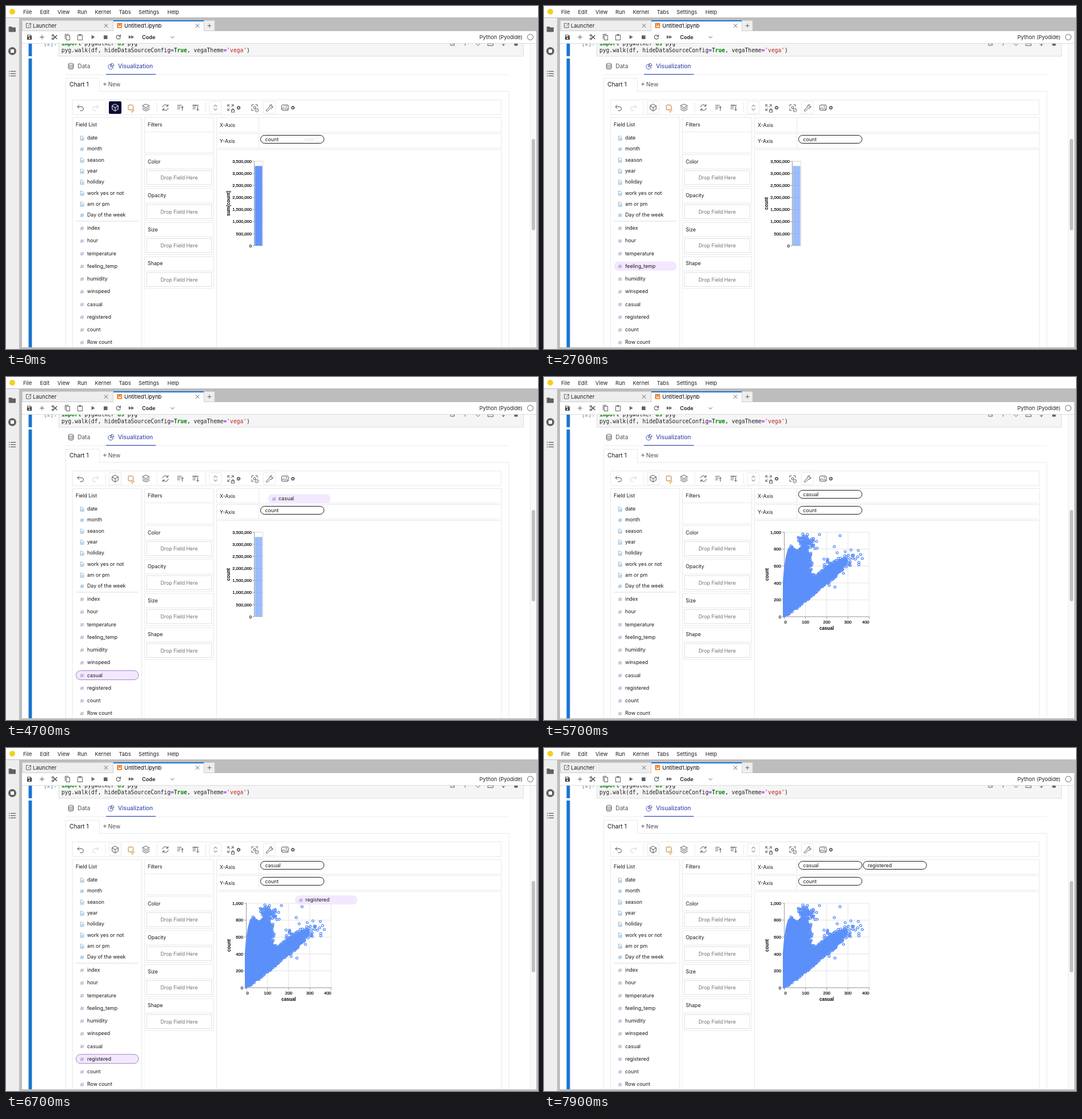
An HTML page for the animation above (8000 ms loop, 931 by 601 pixels).

```html
<!DOCTYPE html>
<html lang="en">
<head>
<meta charset="utf-8">
<title>Notebook chart builder</title>
<style>
  html, body { margin: 0; width: 100%; height: 100%; overflow: hidden; background: #fff; }
  svg { display: block; width: 931px; height: 601px; font-family: Inter, Roboto, sans-serif; }
  text { white-space: pre; }
  .mono { font-family: "DejaVu Sans Mono", "Noto Sans Mono", monospace; }
  .plot { font-family: "Liberation Sans", Arial, sans-serif; }
  .tick { stroke: #000; stroke-width: .2; }
</style>
</head>
<body>
<svg id="stage" viewBox="0 0 931 601" xmlns="http://www.w3.org/2000/svg"></svg>
<script>
const LOOP = 8000, STEP = 100;
const BLUE = '#5b8ff9', LINE = '#e9e9eb', INK = '#18181b', ICON = '#52525b';

// ---------- drawing helpers (text is placed by its vertical centre) ----------
const text = (x, y, s, size = 8.8, fill = INK, extra = '') =>
  `<text x="${x}" y="${y + size * .36}" font-size="${size}" fill="${fill}" ${extra}>${s}</text>`;
const rect = (x, y, w, h, fill = 'none', stroke = 'none', extra = '') =>
  `<rect x="${x}" y="${y}" width="${w}" height="${h}" fill="${fill}" stroke="${stroke}" ${extra}/>`;
const path = (d, stroke = ICON, width = 1, fill = 'none') =>
  `<path d="${d}" fill="${fill}" stroke="${stroke}" stroke-width="${width}" stroke-linecap="round" stroke-linejoin="round"/>`;
const line = (x1, y1, x2, y2, stroke = LINE, width = 1) =>
  `<path d="M${x1} ${y1}L${x2} ${y2}" stroke="${stroke}" stroke-width="${width}"/>`;
const circle = (x, y, r, fill = 'none', stroke = 'none', width = 1) =>
  `<circle cx="${x}" cy="${y}" r="${r}" fill="${fill}" stroke="${stroke}" stroke-width="${width}"/>`;
const at = (x, y, body) => `<g transform="translate(${x} ${y})">${body}</g>`;
const group = (id, body) => `<g id="${id}">${body}</g>`;
const mid = 'text-anchor="middle"', end = 'text-anchor="end"';

// ---------- notebook shell ----------
function shell() {
  const GREY = '#616161';
  const menu = [['File', 30], ['Edit', 59.5], ['View', 90], ['Run', 125], ['Kernel', 155.5],
    ['Tabs', 197.5], ['Settings', 232], ['Help', 282.5]];
  const cross = x => path(`M${x - 3} 31.5l6 6m0 -6l-6 6`, GREY);
  return rect(0, 0, 931, 601, '#bdbdbd') + rect(0, 0, 931, 20, '#fff') +
    rect(0, 21, 23, 580, '#eee') + line(0, 20.5, 931, 20.5, '#bdbdbd') +
    circle(11, 10, 5, '#f5cf1b') +
    menu.map(([s, x]) => text(x, 11, s, 9.3, '#212121')).join('') +
    // side bar
    path('M5.5 36.5h4l1.5 1.5h5.5v7h-11z', GREY, 1, GREY) +
    circle(11, 79, 7, GREY) + rect(8, 76, 6, 6, '#fff') +
    [114.5, 118.5, 122.5].map(y => line(5, y, 6.5, y, GREY, 1.3) + line(8, y, 17, y, GREY, 1.3)).join('') +
    // tab bar
    rect(28, 44, 900, 554, '#fff') +
    rect(28.5, 25.5, 159, 18, '#eee', '#cfcfcf') + rect(346.5, 25.5, 18.5, 18, '#eee', '#cfcfcf') +
    rect(188, 25, 158, 19, '#fff') + rect(188, 25, 158, 2, '#1976d2') +
    path('M39 30.5h-3.5v7.5h7.5v-3.5M41 30.5h2.5v2.5M43 31l-4 4', GREY) +
    rect(194.5, 30, 8.5, 8.5, '#ef6c00') + rect(196.5, 31.5, 5, 5.5, '#fff') +
    path('M197.5 31.5h3v4l-1.5 -1.2l-1.5 1.2z', 'none', 0, '#ef6c00') +
    text(47, 34.5, 'Launcher', 9.4, '#212121') + text(207, 34.5, 'Untitled1.ipynb', 9.4, '#000') +
    cross(175) + cross(335) + path('M353 34.5h6m-3 -3v6', GREY) + tools(GREY);
}

function tools(c) {
  return line(28, 65.5, 928, 65.5, '#dcdcdc') +
    path('M37 50.5h6l2 2v6.5h-8z', 'none', 0, '#444') + rect(38, 51.5, 4.5, 2, '#fff') + circle(41, 56.6, 1.3, '#fff') +
    path('M59.5 54.5h7m-3.5 -3.5v7', c) +
    path('M82 51l7 6.5M82 58l7 -6.5', '#444', 1.2) + circle(82, 51.5, 1.5, '#fff', '#444', 1.2) + circle(82, 57.5, 1.5, '#fff', '#444', 1.2) +
    rect(105.5, 51.5, 6, 8, '#fff', c) + path('M103.5 57.5v-8h6', c) +
    rect(125.5, 51, 8, 8.5, '#fff', c) + rect(127.5, 49.5, 4, 2.5, c) +
    path('M150 51.5v6l5 -3z', c, .5, c) + rect(171, 51.5, 6.5, 6.5, c) +
    path('M199.5 52.5a3.5 3.5 0 1 0 .6 3M200.5 50.5v2.8h-2.8', c, 1.2) +
    path('M215 52v5l4 -2.5zM219.5 52v5l4 -2.5z', c, .5, c) +
    text(238, 54.5, 'Code', 9.1, '#212121', 'font-weight="600"') +
    path('M288.5 53.5l2.8 2.8l2.8 -2.8', c) +
    text(904, 54.5, 'Python (Pyodide)', 9.25, '#212121', end) + circle(917.5, 54.5, 5, '#fff', c);
}

function cell() {
  const span = (s, c, bold) => `<tspan fill="${c}" ${bold ? 'font-weight="700"' : ''}>${s}</tspan>`;
  const kw = s => span(s, '#008000', true), op = span('=', '#aa22ff', true);
  const code = 9.62, mono = 'class="mono"', c = '#616161';
  const marks = path('M778 61v8h6.5v-6M781 66h3M803.5 60v9M822.5 66l3.5 3.5l3.5 -3.5M843.5 66h9v3.5h-9zM870.5 62v7.5M868 67l2.5 2.5l2.5 -2.5', c) +
    rect(889.5, 62, 6, 7.5, c);
  return `<clipPath id="page"><rect x="28" y="66" width="900" height="532"/></clipPath><g clip-path="url(#page)">` +
    rect(92.5, 50.5, 813, 37.5, '#f5f5f5', '#dedede') +
    rect(39.5, 66, 5.9, 22, '#1976d2') + rect(39.5, 92, 5.9, 506, '#1976d2') +
    text(66, 65.2, '[2]:', code, '#607d8b', mono) +
    text(97, 65.2, kw('import') + ' pygwalker ' + kw('as') + ' pyg', code, '#212121', mono) +
    text(97, 77.5, 'pyg.walk(df, hideDataSourceConfig' + op + kw('True') + ', vegaTheme' + op + span("'vega'", '#ba2121') + ')', code, '#212121', mono) +
    marks + '</g>' +
    rect(917, 66, 11, 532, '#fafafa') + line(917.5, 66, 917.5, 598, '#ececec') +
    rect(920, 233, 6, 160, '#c1c1c1', 'none', 'rx="3"');
}

// ---------- chart builder panels ----------
function cube(c) {
  return path('M0 -6l5.2 3v6l-5.2 3l-5.2 -3v-6zM-5.2 -3l5.2 3l5.2 -3M0 0v6', c);
}
function gear(x) {
  return circle(x, 178.3, 2, 'none', ICON, 1.5) + `<circle cx="${x}" cy="178.3" r="3" fill="none" stroke="${ICON}" stroke-width="1" stroke-dasharray="1.2 1.15"/>`;
}
function toolbar() {
  const box = x => rect(x - 10.5, 167.5, 21, 21, '#fff', LINE, 'rx="1.5"');
  const bars = 'M-5 -4h7M-5 -1h5M-5 2h4';
  return rect(116.5, 164.5, 750, 26, '#fff', LINE) +
    [174, 264, 349.5].map(x => line(x, 168, x, 188)).join('') +
    path('M128 173.5l-3 3l3 3M125.5 176.5h6.5a3.5 3.5 0 0 1 0 7h-2') +
    path('M159 173.5l3 3l-3 3M161.5 176.5h-6.5a3.5 3.5 0 0 0 0 7h2', '#d4d4d8') +
    rect(214, 173.5, 8.5, 8.5, 'none', '#b9783c', 'rx="1"') + path('M219 181l5.5 2l-2.5 1l-.8 2.5z', '#e0a040', 1, '#fff') +
    at(245, 178, path('M0 -6l6 3l-6 3l-6 -3zM-6 0l6 3l6 -3M-6 3l6 3l6 -3')) +
    path('M274 177a5 5 0 0 1 9 -2M284 179a5 5 0 0 1 -9 2M283.5 172.5v3h-3M274.5 183.5v-3h3') +
    at(305, 178, path(bars + 'M3.5 5v-7M1.5 0l2 -2l2 2')) + at(332, 178, path(bars + 'M-5 -4h10M3.5 -2v7M1.5 3l2 2l2 -2')) +
    box(366.5) + path('M363.8 176l2.7 -2.7l2.7 2.7M363.8 180l2.7 2.7l2.7 -2.7') +
    at(393, 178, path('M-5 -2v-3h3M5 -2v-3h-3M-5 2v3h3M-5 -5l3.5 3.5M5 -5l-3.5 3.5M-5 5l3.5 -3.5') + rect(1.5, 4, 5, 4, '#fff', ICON) + path('M2.8 4v-1a1.3 1.3 0 0 1 2.6 0v1')) +
    gear(407) +
    at(435, 178, path('M-5 -2v-3h3M5 -2v-3h-3M-5 2v3h3') + circle(0, 0, 2, 'none', ICON) + circle(4, 4.5, 3, '#fff', ICON, .8) + path('M2.5 6l3 -3', ICON, .8)) +
    box(461) + at(461, 178, path('M-5 4l5 -5a3.4 3.4 0 0 1 4.4 -4l-2 2l1 1.6l1.6 .6l1 -1.6a3.4 3.4 0 0 1 -4.5 3.6l-5 5a1.2 1.2 0 0 1 -1.5 -2.2z')) +
    rect(482.5, 173.5, 11.5, 9, 'none', ICON, 'rx="1"') + path('M483 181l3 -3l2.5 2.5l2 -1.5l3 2.5') + circle(490.5, 176.3, .8, 'none', ICON, .8) +
    gear(502) +
    group('aggOff', box(191) + at(191, 178, cube(ICON))) +
    group('aggOn', rect(180, 167, 22, 22, '#0b0a33', 'none', 'rx="2"') + at(191, 178, cube('#fff')));
}

const dims = ['date', '#month', 'season', 'year', 'holiday', 'work yes or not', 'am or pm', '#Day of the week'];
const measures = ['index', 'hour', 'temperature', 'feeling_temp', 'humidity', 'winspeed', 'casual', 'registered', 'count', 'Row count'];
const rowY = i => i < 8 ? 231 + i * 19.3 : 389 + (i - 8) * 22.25;
const chip = (fill, stroke = 'none') => rect(.5, -8, 109.5, 16, fill, stroke, 'rx="8"');
const hash = (x, y, c) => path(`M${x - .9} ${y - 3}l-1 6M${x + 1.9} ${y - 3}l-1 6M${x - 2.3} ${y - 1}h5.3M${x - 2.7} ${y + 1.3}h5.3`, c, .6);
const PURPLE = '#8a7bb0', SKY = '#4f8fc0';

function fields() {
  const doc = y => path(`M130.7 ${y - 3.5}h3l2.3 2.3v5h-5.3zM132 ${y + .3}h2.6M132 ${y + 2}h2.6`, SKY, .65);
  return rect(116.5, 195.5, 121, 420, '#fff', LINE) + text(122, 208, 'Field List') +
    group('hover', chip('#f3e8ff')) +
    dims.map((s, i) => {
      const y = rowY(i);
      return (s[0] === '#' ? hash(133, y + .5, SKY) : doc(y + .5)) + text(142, y, s.replace('#', ''));
    }).join('') +
    line(122, 377, 232, 377, '#dcdcdf') +
    measures.map((s, i) => hash(133, rowY(i + 8) + .5, PURPLE) + text(142, rowY(i + 8), s)).join('');
}

const pill = (x, y, s) => rect(x, y, 111, 14, '#fff', '#18181b', 'rx="7"') + text(x + 8, y + 7, s);

function panels() {
  const slots = ['Color', 'Opacity', 'Size', 'Shape'].map((s, i) => {
    const y = 260.5 + i * 59.5;
    return rect(242.5, y, 121, 56, '#fff', LINE) + line(242, y + 25, 364, y + 25) +
      rect(246, y + 28, 114, 24.5, '#fff', '#dedee2') +
      text(248, y + 12, s) + text(303, y + 40.5, 'Drop Field Here', 8.8, '#71717a', mid);
  }).join('');
  const shelf = (y, s) => rect(368.5, y, 498.5, 25.5, '#fff', LINE) + line(442.5, y, 442.5, y + 25.5) + text(374, y + 13, s);
  return path('M109.3 102v7a4.3 1.9 0 0 0 8.6 0v-7M109.3 104.4a4.3 1.9 0 0 0 8.6 0M109.3 106.8a4.3 1.9 0 0 0 8.6 0', ICON, .9) +
    `<ellipse cx="113.6" cy="102" rx="4.3" ry="1.8" fill="none" stroke="${ICON}" stroke-width=".9"/>` +
    text(125.3, 105.7, 'Data', 10.2, ICON) +
    path('M183 102a4.3 4.3 0 1 0 4.5 4.5h-4.5zM185 100.5a4 4 0 0 1 3.8 4h-3.8z', '#4453b5') +
    text(196, 105.7, 'Visualization', 10, '#3f4fb3', 'font-weight="500"') +
    line(104, 120.5, 880, 120.5, '#ededf0') + rect(175, 119, 87, 1.4, '#4f5fc4') +
    path('M104.5 150v-23.5h59v23.5', LINE) + path('M163.5 149.5h716.5v460M104.5 149.5v460', LINE) +
    text(111, 137.5, 'Chart 1', 10.2) + path('M170.5 137h5m-2.5 -2.5v5', ICON, .9) + text(178.8, 137, 'New', 10, ICON) +
    toolbar() + fields() +
    rect(242.5, 195.5, 121, 62, '#fff', LINE) + line(242, 220.5, 364, 220.5) + text(248, 208, 'Filters') + slots +
    path('M242.5 495v110', '#f4f4f5') +
    shelf(195.5, 'X-Axis') + shelf(223.5, 'Y-Axis') + rect(368.5, 251.5, 498.5, 360, '#fff', LINE) +
    pill(445.5, 226.5, 'count') +
    group('sum', text(522, 234, 'sum', 8.8, '#d9d9de') + path('M543 232.5l1.7 -1.8l1.7 1.8M543 235.5l1.7 1.8l1.7 -1.8', '#d9d9de', .8)) +
    group('xCasual', pill(445.5, 198.5, 'casual')) + group('xReg', pill(558.5, 198.5, 'registered'));
}

// ---------- plots ----------
const TOP = 272, BASE = 420;
const label = (x, y, s, anchor) => text(x, y, s, 7.6, '#000', `class="plot tick" ${anchor}`);
const title = (x, y, s, turn = 0) =>
  `<g transform="translate(${x} ${y}) rotate(${turn})">${text(0, 0, s, 8.15, '#000', `class="plot" font-weight="700" ${mid}`)}</g>`;

function bars(id, name, opacity) {
  let s = rect(434.5, TOP, 15, BASE - TOP, '#fff', '#ddd');
  let ticks = '';
  for (let i = 0; i < 8; i++) {
    const y = BASE - i * (BASE - TOP) / 7;
    s += line(434, y, 449.5, y, '#ddd', .8);
    ticks += line(431, y, 434, y, '#888', .8) + label(430, y, (i * 5e5).toLocaleString('en-US'), end);
  }
  return group(id, s + rect(435.5, 280.3, 13, BASE - 280.3, BLUE, 'none', `opacity="${opacity}"`) +
    line(434.5, TOP, 434.5, BASE, '#888', .8) + ticks + title(389.5, 346, name, -90));
}

function rng(seed) {
  return () => (seed = (seed * 16807) % 2147483647) / 2147483647;
}

function scatter() {
  const X0 = 420.5, W = 148.5, rnd = rng(4217);
  let s = '', marks = '';
  for (let i = 0; i <= 4; i++) {
    const x = X0 + i * W / 4;
    s += line(x, TOP, x, BASE, '#ddd', .8) + line(x, BASE, x, BASE + 4, '#888', .8) +
      label([422.5, x, x, x, 563][i], 429, i * 100, mid);
  }
  for (let i = 0; i <= 5; i++) {
    const y = BASE - i * (BASE - TOP) / 5;
    s += line(X0, y, X0 + W, y, '#ddd', .8) + line(X0 - 4, y, X0, y, '#888', .8) +
      label(415, y, (i * 200).toLocaleString('en-US'), end);
  }
  s += path(`M${X0} ${TOP}V${BASE}H${X0 + W}`, '#888', .8);
  // dense area, through the centres of its outermost points
  const core = [[420.5, 419], [420.5, 360], [422, 340], [425, 318], [429, 302], [434, 298], [439, 303], [445, 307], [451, 297], [460, 297],
    [462, 318], [465, 346], [475, 349], [490, 338], [505, 329], [519, 321], [528, 317], [530, 324], [520, 338],
    [506, 353], [490, 364], [470, 382], [450, 398], [430, 414]];
  const dot = (x, y) => marks += `M${(x - 1.9).toFixed(1)} ${y.toFixed(1)}a1.9 1.9 0 1 0 3.8 0a1.9 1.9 0 1 0 -3.8 0`;
  const bell = () => rnd() + rnd() + rnd() - 1.5;
  core.forEach(([x, y], i) => {
    const [u, v] = core[(i + 1) % core.length];
    const n = Math.ceil(Math.hypot(u - x, v - y) / 2);
    for (let k = 0; k < n; k++) {
      const f = k / n, loose = i < 4 ? 0 : 1.6;
      dot(Math.max(420.5, x + (u - x) * f + bell() * loose), Math.min(419, y + (v - y) * f + bell() * loose));
    }
  });
  for (let i = 0; i < 70; i++) dot(459 + bell() * 13, 290 + bell() * 12);
  for (let i = 0; i < 25; i++) dot(464 + bell() * 6, 322 + bell() * 20);
  for (let i = 0; i < 50; i++) {
    const f = rnd();
    dot(488 + f * 54, 333 - f * 15 + bell() * 10);
  }
  const strays = [[482, 276], [518, 278], [508, 297], [477, 288], [478, 300], [550, 304], [537, 303], [554, 311], [557, 318],
    [551, 325], [549, 315], [545, 319], [551, 329], [536, 330], [524, 344], [509, 368], [499, 365], [453, 275], [445, 281],
    [461, 276], [513, 308], [527, 306], [496, 322], [490, 319], [432, 296]];
  strays.forEach(p => dot(...p));
  return group('scatter', s + path('M' + core.map(p => p.join(' ')).join('L') + 'z', BLUE, 1, BLUE) +
    path(marks, BLUE, 1.4) + title(390, 346, 'count', -90) + title(494.7, 440, 'casual'));
}

// ---------- floating parts ----------
const tip = group('tip', `<g style="filter:drop-shadow(0 1px 1.5px rgba(0,0,0,.3))">` +
  path('M157.5 144.5h67v17.5h-30l-3.5 4l-3.5 -4h-30z', 'none', 0, '#fff') + '</g>' +
  text(191, 153.3, 'Aggregation', 8.8, '#71717a', mid));
const ghost = (id, name) => group(id, chip('#f3e8ff') + hash(11, .5, PURPLE) + text(19, 0, name));

document.getElementById('stage').innerHTML = shell() + cell() +
  `<g clip-path="url(#page)">` + panels() + bars('barSum', 'sum(count)', .95) + bars('barRaw', 'count', .6) + scatter() +
  ghost('dragCasual', 'casual') + ghost('dragReg', 'registered') + tip + '</g>' + rect(28, 598, 900, 3, '#bdbdbd');

// ---------- timeline ----------
const spans = {
  aggOn: [0, 1800], sum: [0, 1800], aggOff: [1800, LOOP], tip: [1600, 2300],
  barSum: [0, 1900], barRaw: [1900, 5100], scatter: [5100, LOOP],
  xCasual: [5000, LOOP], xReg: [7800, LOOP],
  dragCasual: [3600, 5000], dragReg: [6300, 7800], hover: [2300, LOOP]
};
const hovers = [[2300, 3], [2400, 6], [2500, 8], [2600, 10], [2700, 11], [2800, 12], [2900, 13], [3000, 14],
  [5100, -1], [5800, 15], [7900, -1]];
// time, left, vertical centre
const routes = {
  dragCasual: [[3600, 165, 481.5], [3800, 320, 372], [4000, 482, 262], [4100, 528, 234], [4300, 462, 214],
    [4600, 462, 214], [4700, 458, 213.3], [4900, 446, 206]],
  dragReg: [[6300, 165, 506], [6500, 340, 372], [6700, 505, 266.3], [6900, 546, 232], [7100, 556, 219],
    [7400, 570, 209], [7500, 570, 209], [7700, 559, 206]]
};
const el = id => document.getElementById(id);

function place(route, t) {
  const i = route.findIndex(p => p[0] > t);
  if (i < 0) return route[route.length - 1].slice(1);
  if (i === 0) return route[0].slice(1);
  const [a, b] = [route[i - 1], route[i]], f = (t - a[0]) / (b[0] - a[0]);
  return [a[1] + (b[1] - a[1]) * f, a[2] + (b[2] - a[2]) * f];
}

function draw(now) {
  const t = Math.floor((now % LOOP) / STEP) * STEP;
  const active = id => t >= spans[id][0] && t < spans[id][1];
  for (const id in spans) el(id).style.display = active(id) ? '' : 'none';
  for (const id in routes) el(id).setAttribute('transform', `translate(${place(routes[id], t)})`);
  const row = hovers.reduce((r, [from, i]) => t >= from ? i : r, -1);
  const hover = el('hover'), box = hover.firstChild;
  if (row < 0) hover.style.display = 'none';
  else hover.setAttribute('transform', `translate(122 ${rowY(row)})`);
  box.setAttribute('fill', row < 8 ? '#dbeafe' : '#f3e8ff');
  box.setAttribute('stroke', active('dragCasual') || active('dragReg') ? '#a488b8' : 'none');
}

const start = performance.now();
function tick() {
  draw(performance.now() - start);
  requestAnimationFrame(tick);
}
tick();
</script>
</body>
</html>
```
